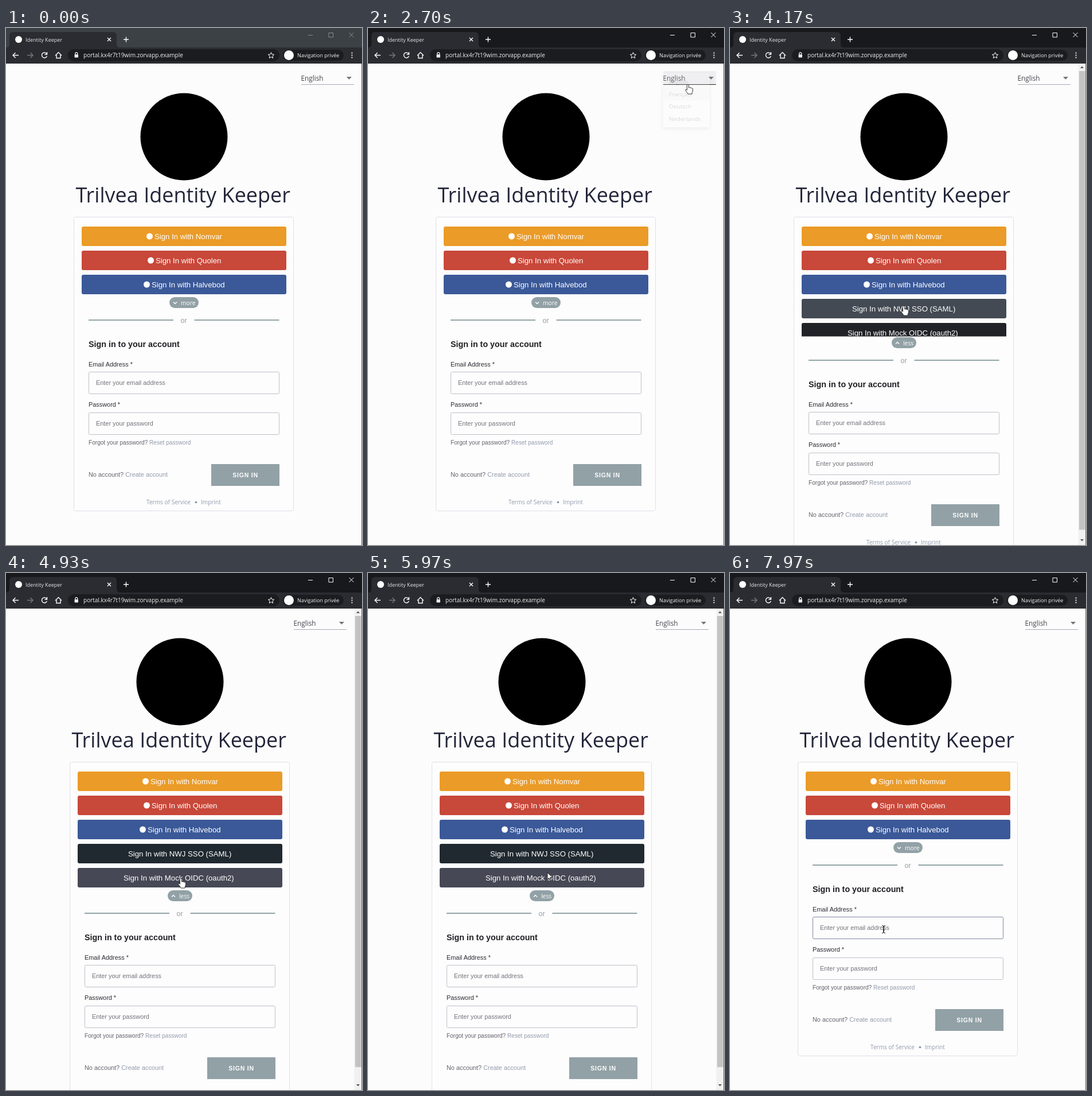
Recreate the animation shown at these times as an HTML page. Size 621 px wide and 901 px high, loop 8000 ms.

```html
<!DOCTYPE html>
<html lang="en">
<head>
<meta charset="utf-8">
<title>Identity Keeper</title>
<style>
  html, body { margin: 0; width: 100%; height: 100%; overflow: hidden; background: #fcfcfc; }
  svg { display: block; }
  text { font-family: "Liberation Sans", Arial, sans-serif; }
  .ui { font-family: "Open Sans", "Noto Sans", sans-serif; }
  .bold { font-weight: bold; }
  .link { fill: #929aac; }
  .line { fill: none; stroke: #fff; stroke-width: 1.4; }
  .field { fill: #fdfdfd; stroke: #bfbfca; }
  #menu { filter: drop-shadow(0 3px 4px #0006); }
</style>
</head>
<body>
<svg width="621" height="901" viewBox="0 0 621 901">
  <defs>
    <clipPath id="listClip"><rect id="listWindow" x="118" y="340" width="386"/></clipPath>
  </defs>
  <rect width="621" height="901" fill="#fcfcfc"/>

  <g id="page">
    <circle cx="310.5" cy="189.5" r="76"/>
    <text class="ui" x="121.5" y="304" font-size="36" fill="#23263a">Trilvea Identity Keeper</text>
    <rect id="card" x="118.5" y="329.5" width="383" rx="3" fill="#fdfdfd" stroke="#e0e0ea"/>
    <g id="list" clip-path="url(#listClip)"></g>
    <g id="form"></g>
  </g>

  <g id="select">
    <rect id="focus" x="515" y="75" width="92" height="23" fill="#eeeef1"/>
    <text id="choice" class="ui" x="514.5" y="92" font-size="11.8" fill="#45454d"></text>
    <path d="M594 85h9l-4.5 4.8z" fill="#757575"/>
    <rect id="underline" x="515" y="98" width="92" height="1"/>
  </g>
  <g id="menu"></g>

  <g id="scrollbar">
    <rect x="607.5" y="62" width="13" height="839" fill="#f1f1f1"/>
    <rect id="thumb" x="609" y="75" width="10.5" fill="#c3c3c3"/>
    <path d="M611 70h6l-3-3.5zM611 891h6l-3 3.5z" fill="#555"/>
  </g>

  <g id="browser">
    <rect id="strip" width="621" height="62"/>
    <path d="M0 34Q6 34 6 28V14Q6 7 13 7H186Q193 7 193 14V28Q193 34 199 34H621V62H0z" fill="#2b2c31"/>
    <circle cx="22" cy="20" r="6" fill="#fff"/>
    <text class="ui" x="34" y="23.5" font-size="9" fill="#e4e4e8">Identity Keeper</text>
    <path class="line" d="M177 17l6 6m0-6l-6 6M205 20h9m-4.5-4.5v9"/>
    <path id="controls" class="line" style="stroke-width:1" d="M527 12.5h8M563 8.500h7.5v7.5h-7.5zM598.5 8l8 8m0-8l-8 8"/>
    <path class="line" d="M22 47.5h-10m4.5-4.5l-4.5 4.5 4.5 4.5"/>
    <path class="line" style="stroke:#77777d" d="M37 47.5h10m-4.5-4.5l4.5 4.5-4.5 4.5"/>
    <path class="line" d="M71 45a4.6 4.6 0 1 0 .4 4M71.5 42v4h-4"/>
    <path class="line" d="M86 48l5.5-5.5 5.5 5.5M88 47v5.5h7V47"/>
    <rect x="108" y="37" width="369" height="21" rx="10.5" fill="#1b1c20"/>
    <rect x="119.5" y="46" width="6.5" height="5.5" rx="1" fill="#e8e8ea"/>
    <path class="line" style="stroke-width:1.2" d="M120.8 46v-1.3a2 2 0 0 1 4 0V46"/>
    <text class="ui" x="135" y="51" font-size="10" fill="#f0f0f2">portal.kx4r7t19wim.zorvapp.example</text>
    <path class="line" style="stroke-width:1" d="M462.5 42.5l1.5 3.4 3.7.4-2.8 2.5.8 3.7-3.2-1.9-3.2 1.9.8-3.7-2.8-2.5 3.7-.4z"/>
    <rect x="483" y="38" width="106" height="19" rx="9.5" fill="#1b1c20"/>
    <circle cx="493.5" cy="47.5" r="8.5" fill="#fff"/>
    <text class="ui" x="508" y="51" font-size="9" fill="#f0f0f2">Navigation privée</text>
    <path d="M602.5 42.5h2v2h-2zm0 4h2v2h-2zm0 4h2v2h-2z" fill="#eee"/>
  </g>
  <rect x="620" y="62" width="1" height="839" fill="#6b6b78"/>

  <g id="cursor" stroke-linejoin="round">
    <path id="arrow" d="M0 0V12l2.8-2.6 1.8 4.2 1.9-.8-1.8-4.1H8.4z" fill="#fff" stroke="#111" stroke-width=".9"/>
    <path id="hand" d="M-1.5 1Q0-1 1.5 1V6q1.3-1 2.5.2 1.5-.6 2.3.6 2-.4 2.2 1.4V11q0 2-1.2 3.5V17H0q-1-2.5-4.5-6.5 0-2 2-1.2l1 1z" fill="#fff" stroke="#222" stroke-width=".9"/>
    <path id="beam" d="M-3-6.5q3 0 3 1.5V5q0 1.5-3 1.5M3-6.5q-3 0-3 1.5V5q0 1.5 3 1.5M-1.5 1h3" fill="none" stroke="#111"/>
  </g>
</svg>

<script>
const $ = id => document.getElementById(id);
const LOOP = 8000, EXPANDED = 84;

const languages = {
  en: {
    signIn: 'Sign In with', buttonX: [259, 261, 254], pill: [285, 51, 'more'], or: 'or', gap: 18,
    heading: 'Sign in to your account', email: 'Email Address *', emailHint: 'Enter your email address',
    password: 'Password *', passwordHint: 'Enter your password',
    forgot: 'Forgot your password?', reset: 'Reset password',
    noAccount: 'No account?', create: 'Create account', submit: 'SIGN IN',
    terms: 'Terms of Service', termsX: 245, imprint: 'Imprint', imprintX: 340
  },
  fr: {
    signIn: 'Connectez-vous avec', buttonX: [229.5, 232, 224.5], pill: [288, 45, 'plus'], or: 'ou', gap: 20,
    heading: 'Connexion à votre compte', email: 'Adresse de messagerie *', emailHint: 'votre.nom@poste.example',
    password: 'Mot de passe *', passwordHint: 'Entrez votre mot de passe',
    forgot: 'Mot de passe oublié ?', reset: 'Réinitialiser le mot de passe',
    noAccount: 'Pas encore de compte ?', create: 'créer un compte', submit: 'CONNEXION',
    terms: "Conditions d'utilisation", termsX: 224, imprint: 'Imprimer', imprintX: 352
  }
};
const providers = [['Nomvar', '#eb9b27'], ['Quolen', '#c8483a'], ['Halvebod', '#3b5998']];
const extras = [['NWJ SSO (SAML)', 220], ['Mock OIDC (oauth2)', 212]];

const text = (s, x, y, size, fill, attrs = '') =>
  `<text x="${x}" y="${y}" font-size="${size}" fill="${fill}" ${attrs}>${s}</text>`;
const rect = (x, y, w, h, fill, attrs = '') =>
  `<rect x="${x}" y="${y}" width="${w}" height="${h}" fill="${fill}" ${attrs}/>`;
const withLink = (s, link) => `${s} <tspan class="link">${link}</tspan>`;
const eachLanguage = draw =>
  Object.entries(languages).map(([code, words]) => `<g class="${code}">${draw(words)}</g>`).join('');
const rowTop = i => 346 + 42 * i;

const row = (i, fill, id = '') => rect(132, rowTop(i), 357, 34, fill, `rx="3" ${id}`);
$('list').innerHTML =
  providers.map(([, fill], i) => row(i, fill)).join('') +
  eachLanguage(w => providers.map(([name], i) => {
    const x = w.buttonX[i], y = rowTop(i);
    return `<circle cx="${x - 8.5}" cy="${y + 17}" r="5.5" fill="#fff"/>` +
      text(`${w.signIn} ${name}`, x, y + 21.5, 13.2, '#fff');
  }).join('')) +
  extras.map(([name, x], i) =>
    row(i + 3, '#222', `id="extra${i}"`) + text(`Sign In with ${name}`, x, rowTop(i + 3) + 21.5, 13.2, '#fff')).join('');

const pill = ([x, width, label], up) =>
  rect(x, 469, width, 19, '#92a1a6', 'rx="9.5"') +
  `<path class="line" d="M${x + 7} ${up ? 480.5 : 477.5}l3 ${up ? -3 : 3} 3 ${up ? 3 : -3}"/>` +
  text(label, x + 20, 483, 10.3, '#fff', 'class="ui"');

$('form').innerHTML =
  `<g id="less">${pill([289, 43, 'less'], true)}</g>` +
  `<g id="more">${eachLanguage(w => pill(w.pill))}</g>` +
  `<rect id="emailField" class="field" x="144.5" y="599.5" width="332" height="38" rx="2"/>
   <rect class="field" x="144.5" y="670.5" width="332" height="38" rx="2"/>` +
  rect(358, 760, 119, 38, '#92a1a6') +
  eachLanguage(w =>
    rect(144, 508, 166 - w.gap, 2, '#93a5a7') + rect(310.5 + w.gap, 508, 166 - w.gap, 2, '#93a5a7') +
    text(w.or, 310, 513.5, 12.5, '#999da5', 'text-anchor="middle"') +
    text(w.heading, 144, 556, 14.3, '#1f2024', 'class="bold"') +
    text(w.email, 144, 589.5, 10.9, '#2c2c34') +
    text(w.emailHint, 157, 622, 10.9, '#73737c') +
    text(w.password, 144, 660, 10.9, '#2c2c34') +
    text(w.passwordHint, 157, 693, 10.9, '#73737c') +
    text(withLink(w.forgot, w.reset), 144, 725.5, 10.1, '#62626c') +
    text(withLink(w.noAccount, w.create), 144, 782, 10.9, '#62626c') +
    text(w.submit, 417.5, 783, 10.5, '#fff', 'class="bold" text-anchor="middle" letter-spacing=".8"') +
    text(w.terms, w.termsX, 830, 10.1, '#929aac', 'class="ui"') +
    `<circle cx="${w.imprintX - 8.5}" cy="826.5" r="1.8" fill="#7f8ba5"/>` +
    text(w.imprint, w.imprintX, 830, 10.1, '#929aac', 'class="ui"'));

$('menu').innerHTML = rect(515, 75, 93, 124, '#fff', 'rx="3"') +
  ['English', 'Français', 'Deutsch', 'Nederlands'].map((name, i) =>
    rect(515, 81 + 28 * i, 93, 28, '#fff', `id="item${i}"`) +
    text(name, 527, 100 + 28 * i, 11.8, '#3c3c44', 'class="ui"')).join('');

// time, x, y, pointer shape from then on
const path = [
  [300, 612, 260, 'arrow'], [800, 560, 90, 'hand'], [980, 560, 90, 'hand'], [1380, 557, 131, 'hand'],
  [1720, 557, 131, 'hand'], [1980, 559, 90, 'hand'], [2130, 559, 90, 'hand'], [2400, 558, 98, 'hand'],
  [2800, 558, 98, 'arrow'], [3450, 310, 478, 'hand'], [3960, 310, 478, 'hand'], [4130, 303, 484, 'hand'],
  [4300, 303, 484, 'hand'], [4750, 305, 532, 'hand'], [5100, 305, 532, 'hand'], [5700, 313, 522, 'arrow'],
  [6200, 313, 522, 'arrow'], [6600, 304, 562, 'hand'], [6950, 304, 562, 'arrow'], [7600, 268, 621, 'beam']
];
// opening, choosing, item selected while open
const menuTimes = [[950, 1620, 0], [2080, 2590, 1]];

const smooth = (t, start, end) => {
  const u = Math.min(1, Math.max(0, (t - start) / (end - start)));
  return u * u * (3 - 2 * u);
};
const show = (node, on) => node.style.display = on ? '' : 'none';
const set = (id, name, value) => $(id).setAttribute(name, value);

function pointerAt(t) {
  const i = path.findLastIndex(key => key[0] <= t);
  if (i < 0) return null;
  const [start, x, y, shape] = path[i], [end, nextX, nextY] = path[i + 1] || [LOOP, x, y];
  const u = smooth(t, start, end);
  return { x: x + (nextX - x) * u, y: y + (nextY - y) * u, shape };
}

function drawMenu(t, pointer) {
  const open = menuTimes.find(([start, end]) => t >= start && t < end + 220);
  show($('menu'), open);
  if (!open) return;
  const [start, end, selected] = open;
  const grown = smooth(t, start, start + 200) - smooth(t, end, end + 220);
  const opacity = smooth(t, start, start + 150) * (1 - smooth(t, end, end + 150));
  const scale = 0.75 + 0.25 * grown;
  set('menu', 'transform', `translate(512 90) scale(${scale} ${scale * scale}) translate(-512 -90)`);
  set('menu', 'opacity', opacity);
  const hovered = Math.floor((pointer.y - 81) / 28);
  for (let i = 0; i < 4; i++)
    set('item' + i, 'fill', i === selected ? '#ebebf1' : i === hovered ? '#f6f6f2' : '#fff');
}

function draw(t) {
  const pointer = pointerAt(t);
  const active = t >= 300;
  const french = t >= menuTimes[0][1] && t < menuTimes[1][1];
  const extra = EXPANDED * (smooth(t, 3950, 4250) - smooth(t, 6800, 7100));
  const listHeight = 128 + extra;
  const scrolling = extra > 58.5;
  const over = (x, y, w, h) => pointer && pointer.x >= x && pointer.x < x + w && pointer.y >= y && pointer.y < y + h;

  document.querySelectorAll('.en').forEach(node => show(node, !french));
  document.querySelectorAll('.fr').forEach(node => show(node, french));
  set('strip', 'fill', active ? '#18191d' : '#3b4144');
  set('controls', 'opacity', active ? 1 : 0.4);

  set('page', 'transform', `translate(${scrolling ? -7 : 0})`);
  set('select', 'transform', `translate(${scrolling ? -13 : 0})`);
  set('form', 'transform', `translate(0 ${Math.round(extra)})`);
  set('card', 'height', 512 + extra);
  set('listWindow', 'height', listHeight);
  const expanded = t >= 3950 && t < 6800;
  show($('less'), expanded);
  show($('more'), !expanded);
  extras.forEach((_, i) => {
    const top = rowTop(i + 3);
    const hovered = over(125, top, 357, Math.min(34, 340 + listHeight - top));
    set('extra' + i, 'fill', hovered ? ['#434a53', '#464855'][i] : ['#202930', '#212227'][i]);
  });
  $('emailField').style.stroke = over(144, 599 + extra, 332, 39) ? '#8189a0' : '';

  show($('scrollbar'), scrolling);
  set('thumb', 'height', 810 * 839 / (780.5 + extra));

  $('choice').textContent = french ? 'Français' : 'English';
  show($('focus'), t >= menuTimes[0][0] && t < 3950);
  set('underline', 'fill', over(515, 75, 92, 25) ? '#222' : '#a9a9b6');
  drawMenu(t, pointer);

  show($('cursor'), pointer);
  if (pointer) {
    set('cursor', 'transform', `translate(${pointer.x} ${pointer.y})`);
    for (const shape of ['arrow', 'hand', 'beam']) show($(shape), shape === pointer.shape);
  }
}

function tick() {
  draw(performance.now() % LOOP);
  requestAnimationFrame(tick);
}
tick();
</script>
</body>
</html>
```
